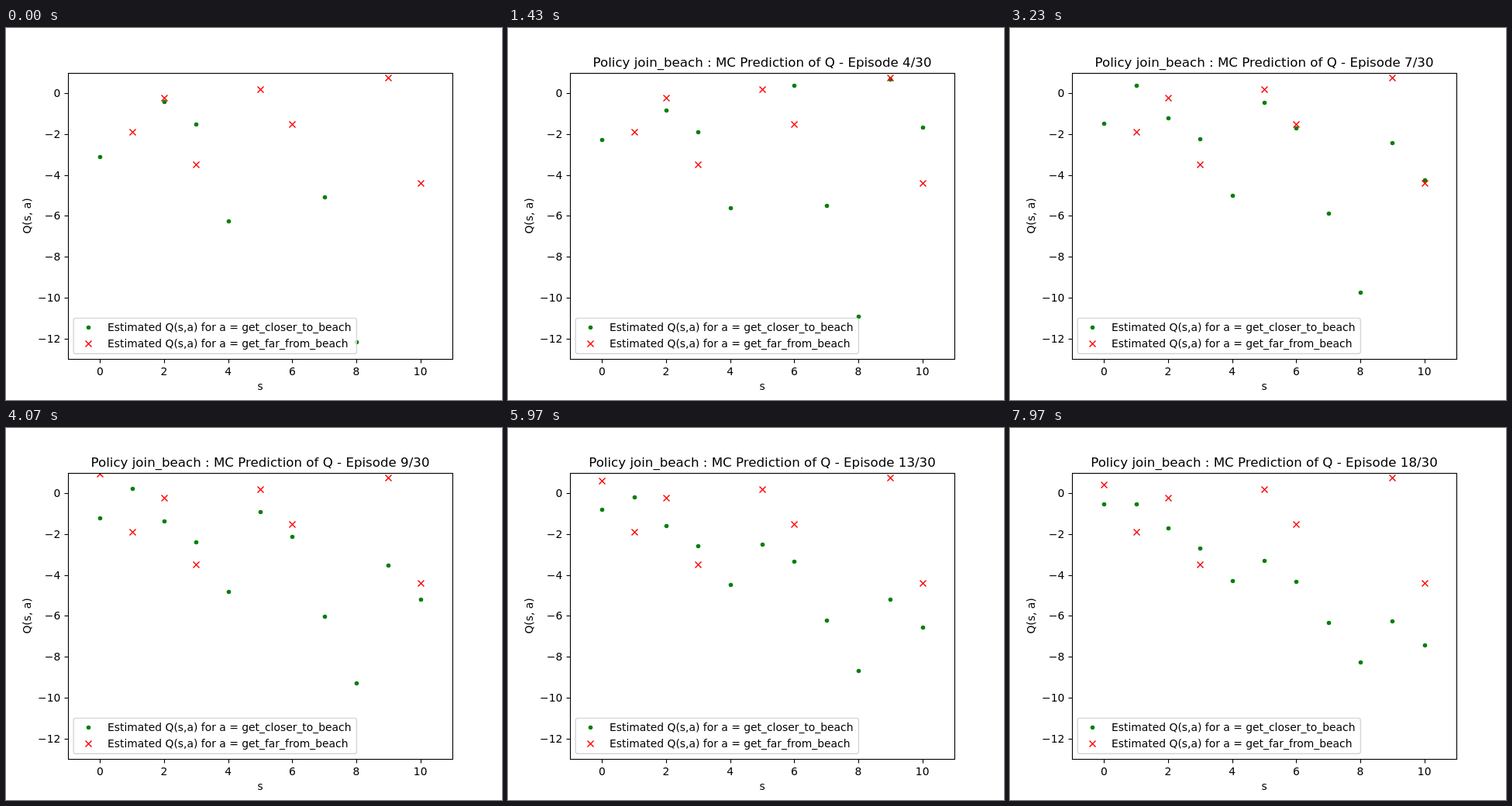
Recreate the animation shown at these times as an HTML page with a canvas. Size 640 by 480 pixels, loop 8000 ms.

```html
<!DOCTYPE html>
<html lang="en">
<head>
<meta charset="utf-8">
<title>MC Prediction of Q</title>
<style>
  html, body { margin: 0; width: 100%; height: 100%; overflow: hidden; background: #fff; }
  canvas { display: block; }
</style>
</head>
<body>
<canvas id="stage" width="640" height="480"></canvas>
<script>
const ctx = document.getElementById('stage').getContext('2d');

const LOOP = 8000;
const TICK = 100 / 3;      // one update per tick
const EPISODE = 14;        // ticks per episode
const ALPHA = 0.1, GAMMA = 0.98;
const LINE = 0.8 / 0.72, STROKE = 1 / 0.72;
const SMALL = 10 / 0.72, LARGE = 12 / 0.72;

// First estimates by state; null means off the chart
const closer = [-3.1, 1.88, -0.4, -1.5, -6.25, 4.25, 2.64, -5.08, -12.177, 4.02, 1.11];
const far = [2.45, -1.9, -0.23, -3.5, null, 0.19, -1.5, null, null, 0.75, -4.4];

// Tick of the episode at which each state is updated
const closerTick = [7, 12, 3, 8, 5, 10, 11, 4, 6, 2, 9];
const FAR_TICK = 1;

const xOf = s => 80 + 496 / 12 * (s + 1);
const yOf = q => 57.6 + 26.4 * (1 - q);
const snap = v => Math.floor(v + 0.5) + 0.5;

// Discounted cost of walking s steps to the beach
const goal = s => -(1 - GAMMA ** s) / (1 - GAMMA);
const learn = (start, end, visits) => end + (start - end) * (1 - ALPHA) ** visits;

function text(str, x, y, align = 'center', size = SMALL) {
  ctx.font = `${size}px "DejaVu Sans", sans-serif`;
  ctx.textAlign = align;
  ctx.fillStyle = '#000';
  ctx.fillText(str, x, y);
}

function line(x1, y1, x2, y2) {
  ctx.beginPath();
  ctx.moveTo(x1, y1);
  ctx.lineTo(x2, y2);
  ctx.stroke();
}

function dot(x, y) {
  ctx.fillStyle = '#008000';
  ctx.beginPath();
  ctx.arc(snap(x), snap(y), 2.78, 0, 2 * Math.PI);
  ctx.fill();
}

function cross(x, y) {
  const cx = snap(x), cy = snap(y);
  ctx.strokeStyle = '#f00';
  ctx.lineWidth = STROKE;
  line(cx - 4, cy - 4, cx + 4, cy + 4);
  line(cx - 4, cy + 4, cx + 4, cy - 4);
}

function drawPoints(visits) {
  ctx.save();
  ctx.beginPath();
  ctx.rect(80, 58, 496, 370);
  ctx.clip();
  closer.forEach((q, s) => dot(xOf(s), yOf(learn(q, goal(s), visits(closerTick[s])))));
  far.forEach((q, s) => {
    if (q === null) return;
    cross(xOf(s), yOf(s ? q : learn(q, 0, visits(FAR_TICK))));
  });
  ctx.restore();
}

function drawAxes() {
  ctx.strokeStyle = '#000';
  ctx.lineWidth = LINE;
  ctx.strokeRect(80.5, 58.5, 496, 369);
  for (let s = 0; s <= 10; s += 2) {
    const x = snap(xOf(s));
    line(x, 427.5, x, 432.5);
    text(String(s), xOf(s), 448);
  }
  for (let q = 0; q >= -12; q -= 2) {
    const y = snap(yOf(q));
    line(75.5, y, 80.5, y);
    text(q ? '\u2212' + -q : '0', 70.3, y + 4.5, 'right');
  }
  text('s', 328, 467);
  ctx.save();
  ctx.translate(32, 242.4);
  ctx.rotate(-Math.PI / 2);
  text('Q(s, a)', 0, 0);
  ctx.restore();
}

function drawLegend() {
  ctx.beginPath();
  ctx.roundRect(87.2, 374.4, 365.2, 45.8, 2.8);
  ctx.fillStyle = 'rgba(255,255,255,0.8)';
  ctx.fill();
  ctx.strokeStyle = 'rgba(204,204,204,0.8)';
  ctx.lineWidth = STROKE;
  ctx.stroke();
  dot(106, 386);
  text('Estimated Q(s,a) for a = get_closer_to_beach', 131, 391, 'left');
  cross(106, 407);
  text('Estimated Q(s,a) for a = get_far_from_beach', 131, 412, 'left');
}

function draw(t) {
  const tick = Math.floor((t + 5) / TICK) - 1;
  const episode = Math.max(0, Math.floor(tick / EPISODE));
  const step = tick - episode * EPISODE;
  const visits = at => episode + (step >= at ? 1 : 0);

  ctx.fillStyle = '#fff';
  ctx.fillRect(0, 0, 640, 480);
  drawPoints(visits);
  drawAxes();
  drawLegend();
  if (tick >= 0) {
    text(`Policy join_beach : MC Prediction of Q - Episode ${episode + 1}/30`, 328, 49.5, 'center', LARGE);
  }
}

function frame() {
  draw(Math.min(performance.now() % LOOP, LOOP - 6));
  requestAnimationFrame(frame);
}
frame();
</script>
</body>
</html>
```
